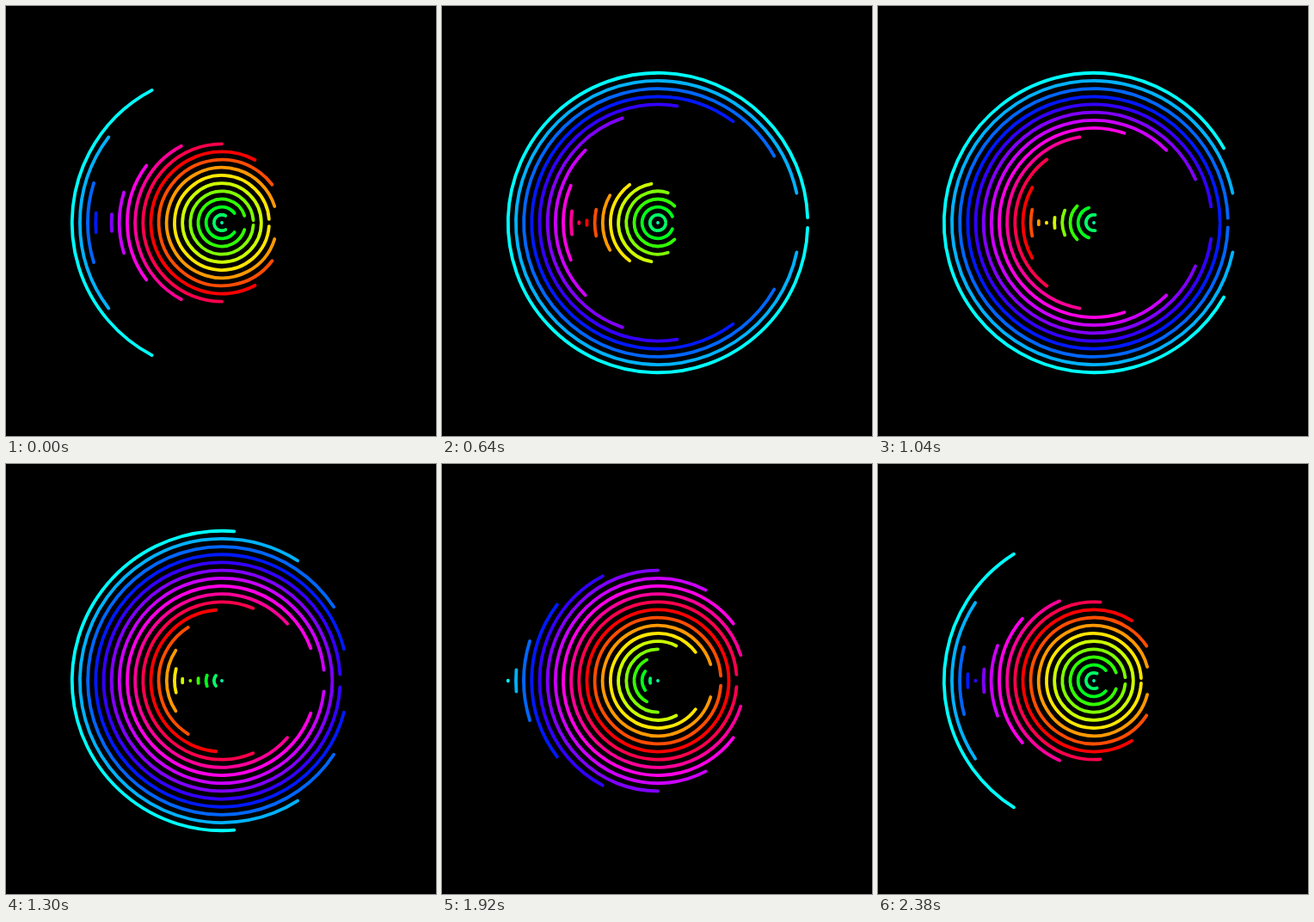
These frames come from a looping animation (500x500 px, 2400 ms). An HTML page with a canvas:

```html
<!DOCTYPE html>
<html lang="en">
<head>
<meta charset="utf-8">
<title>Rainbow arcs</title>
<style>
html, body { margin: 0; width: 100%; height: 100%; overflow: hidden; background: #000; }
canvas { display: block; }
</style>
</head>
<body>
<canvas id="stage" width="500" height="500"></canvas>
<script>
const ctx = document.getElementById('stage').getContext('2d');
const LOOP = 2400, STEP = 20;
const RINGS = 20, SPACING = 9.17, LINE = 3.8;
const CX = 251, CY = 252;

function drawRing(i, progress) {
  // Each ring opens from its left point and closes again, one twentieth of a loop apart.
  const half = Math.PI * Math.sin(Math.PI * (progress + (i - 15) / RINGS)) ** 2;
  if (half === 0) return;
  const color = `hsl(${(522 - 18 * i) % 360}, 100%, 50%)`;
  ctx.beginPath();
  if (i === 0) {
    ctx.fillStyle = color;
    ctx.arc(CX, CY, LINE / 2, 0, 2 * Math.PI);
    ctx.fill();
    return;
  }
  const reach = Math.max(half, 0.002);
  ctx.strokeStyle = color;
  ctx.arc(CX, CY, i * SPACING, Math.PI - reach, Math.PI + reach);
  ctx.stroke();
}

function draw(time) {
  const progress = Math.floor((time % LOOP) / STEP) * STEP / LOOP;
  ctx.fillStyle = '#000';
  ctx.fillRect(0, 0, 500, 500);
  ctx.lineWidth = LINE;
  ctx.lineCap = 'round';
  for (let i = 0; i < RINGS; i++) drawRing(i, progress);
}

let start;
function tick(now) {
  start ??= now;
  draw(Math.max(0, now - start));
  requestAnimationFrame(tick);
}
draw(0);
requestAnimationFrame(tick);
</script>
</body>
</html>
```
